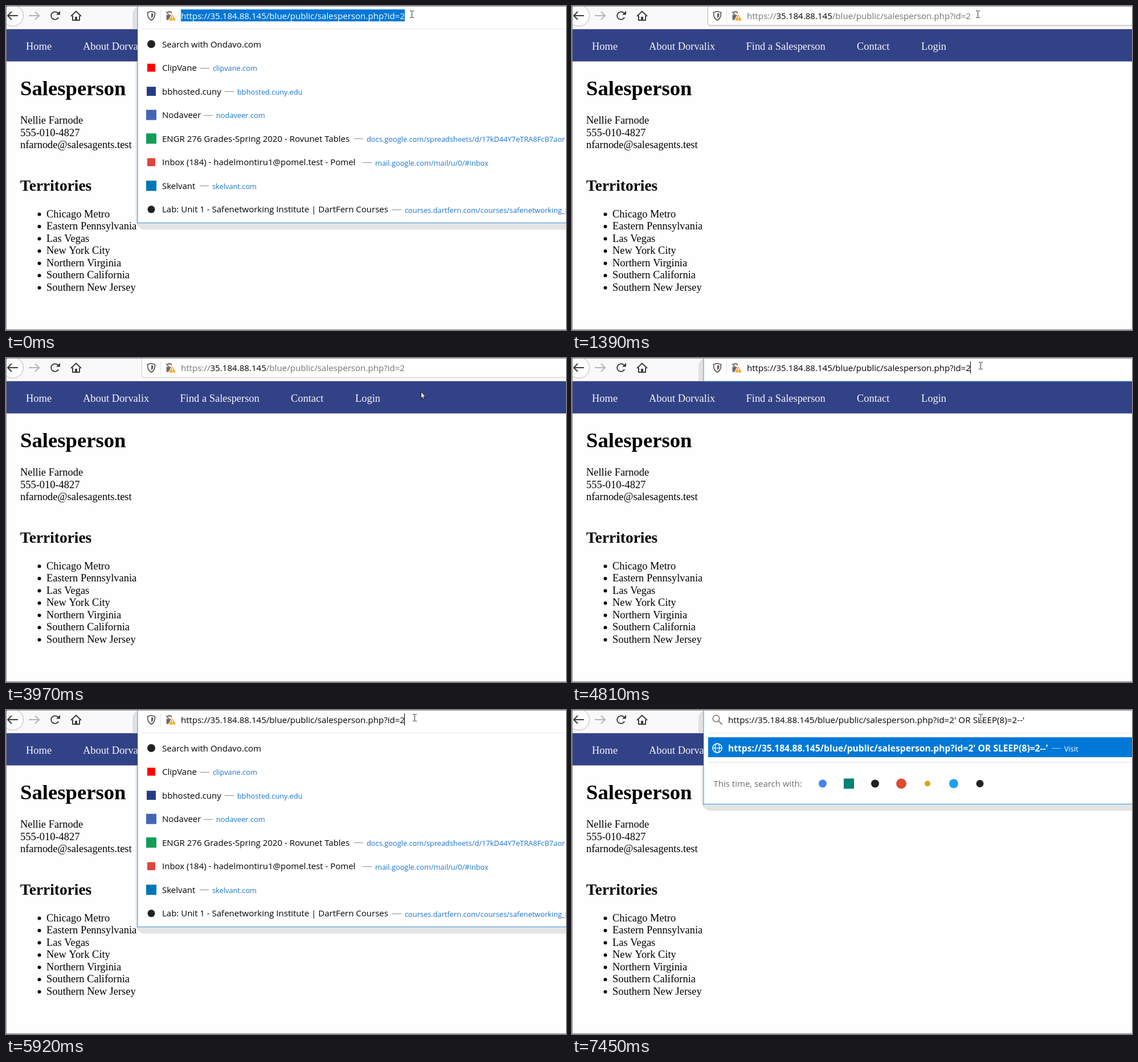
These frames come from a looping animation (983 px wide and 570 px high, 8 s). An HTML page with a canvas:

```html
<!DOCTYPE html>
<html lang="en">
<head>
<meta charset="utf-8">
<title>Address bar</title>
<style>
html, body { margin: 0; width: 100%; height: 100%; overflow: hidden; background: #fff; }
canvas { display: block; }
</style>
</head>
<body>
<canvas id="stage" width="983" height="570"></canvas>
<script>
const ctx = document.getElementById('stage').getContext('2d');
const W = 983, H = 570, LOOP = 8000;
const SANS = '"Open Sans", "Noto Sans", sans-serif';
const SERIF = '"Liberation Serif", "Times New Roman", serif';
const UI = '15.1px ' + SANS, ROW = '15px ' + SANS, SMALL = '12.8px ' + SANS;
const BLUE = '#0078d7', DARK = '#3d3d3e', LINK = '#1a73d0', INK = '#000';

const HOST = '35.184.88.145';
const PATH = '/blue/public/salesperson.php?id=2';
const URL_TEXT = 'https://' + HOST + PATH;
const TYPED = URL_TEXT + "' OR SLEEP(8)=2--'";

// icon shape, colour, half size, title, link x, link
const ROWS = [
  ['circle', '#222', 7, 'Search with Ondavo.com'],
  ['square', '#f00', 7, 'ClipVane', 363, 'clipvane.com'],
  ['square', '#243c84', 8, 'bbhosted.cuny', 406, 'bbhosted.cuny.edu'],
  ['square', '#4267b2', 9, 'Nodaveer', 369, 'nodaveer.com'],
  ['square', '#0f9d58', 9, 'ENGR 276 Grades-Spring 2020 - Rovunet Tables', 633,
    'docs.google.com/spreadsheets/d/17kD44Y7eTRA8FcB7aor'],
  ['square', '#e0443a', 7, 'Inbox (184) - hadelmontiru1@pomel.test - Pomel', 648,
    'mail.google.com/mail/u/0/#inbox'],
  ['square', '#0077b5', 9, 'Skelvant', 362, 'skelvant.com'],
  ['circle', '#222', 6.5, 'Lab: Unit 1 - Safenetworking Institute | DartFern Courses', 700,
    'courses.dartfern.com/courses/safenetworking_in'],
];
const ENGINES = [
  ['circle', '#4285f4', 7], ['square', '#008373', 9], ['circle', '#222', 7],
  ['circle', '#de4b33', 9], ['circle', '#e0a21b', 5], ['circle', '#1da1f2', 8],
  ['circle', '#222', 6.5],
];
const TERRITORIES = ['Chicago Metro', 'Eastern Pennsylvania', 'Las Vegas', 'New York City',
  'Northern Virginia', 'Southern California', 'Southern New Jersey'];

// time, x, y of the pointer
const POINTER = [
  [0, 712, 14], [2340, 653, 34], [2490, 400, 39], [2610, 122, 15], [2760, 86, 16],
  [2890, 330, 150], [3020, 644, 299], [3160, 720, 366], [3410, 725, 369], [3560, 794, 230],
  [3690, 734, 84], [3840, 725, 70], [3970, 728, 59], [4110, 722, 36], [4240, 718, 15],
  [4390, 717, 13],
];

function text(str, x, y, font, color) {
  ctx.font = font;
  ctx.fillStyle = color;
  ctx.fillText(str, x, y);
  return x + ctx.measureText(str).width;
}

function rect(x, y, w, h, color) {
  ctx.fillStyle = color;
  ctx.fillRect(x, y, w, h);
}

function path(points, color, width, close) {
  ctx.beginPath();
  points.forEach(([x, y]) => ctx.lineTo(x, y));
  if (close) ctx.closePath();
  if (width) {
    ctx.strokeStyle = color;
    ctx.lineWidth = width;
    ctx.stroke();
  } else {
    ctx.fillStyle = color;
    ctx.fill();
  }
}

function ring(x, y, r, color, width, from = 0, to = Math.PI * 2) {
  ctx.beginPath();
  ctx.arc(x, y, r, from, to);
  ctx.strokeStyle = color;
  ctx.lineWidth = width;
  ctx.stroke();
}

function dot(x, y, r, color) {
  ctx.beginPath();
  ctx.arc(x, y, r, 0, Math.PI * 2);
  ctx.fillStyle = color;
  ctx.fill();
}

function badge(shape, color, r, x, y) {
  if (shape === 'circle') dot(x, y, r, color);
  else rect(x - r, y - r, 2 * r, 2 * r, color);
}

function drawPage() {
  rect(0, 0, W, H, '#fefefe');
  rect(0, 0, W, 41, '#f9f9fa');
  rect(0, 40, W, 1, '#cfd1dc');
  rect(0, 41, W, 56.5, '#324286');
  const body = '18.45px ' + SERIF;
  [['Home', 35], ['About Dorvalix', 135], ['Find a Salesperson', 305.5],
    ['Contact', 500], ['Login', 613]].forEach(([s, x]) => text(s, x, 77, body, '#f4f5fa'));
  text('Salesperson', 25, 157, 'bold 36.7px ' + SERIF, INK);
  ['Nellie Farnode', '555-010-4827', 'nfarnode@salesagents.test']
    .forEach((s, i) => text(s, 25, 207 + i * 21.5, body, INK));
  text('Territories', 25, 325, 'bold 27.4px ' + SERIF, INK);
  TERRITORIES.forEach((s, i) => {
    dot(58.5, 366.5 + i * 21.55, 3, INK);
    text(s, 71, 371.7 + i * 21.55, body, INK);
  });
}

function drawArrow(x1, x2, color) {
  const s = Math.sign(x2 - x1);
  path([[x1, 17], [x2, 17]], color, 2);
  path([[x2 - s * 7, 10], [x2, 17], [x2 - s * 7, 24]], color, 2);
}

function drawReload(t) {
  const loading = t >= 440 && t < 710;
  ctx.save();
  if (t >= 590 && t < 840) ctx.globalAlpha = 0.5;
  if (t >= 840 && t < 1390) ctx.globalAlpha = 0.4;
  if (loading) {
    const r = t < 590 ? 6.5 : 4.5;
    path([[86.5 - r, 16.5 - r], [86.5 + r, 16.5 + r]], DARK, 2);
    path([[86.5 + r, 16.5 - r], [86.5 - r, 16.5 + r]], DARK, 2);
  } else {
    ring(86, 17, 6.8, DARK, 2, 0.45, Math.PI * 2 - 0.7);
    path([[95, 8.5], [95, 15.5], [88, 15.5]], DARK, 0, true);
  }
  ctx.restore();
}

function drawToolbar(t) {
  if (t >= 2610 && t < 2760) rect(107, 1, 32, 32, '#e1e1e2');
  if (t >= 2760 && t < 2890) rect(70, 1, 34, 32, '#e1e1e2');
  dot(12, 17, 18.5, '#fdfdfd');
  ring(12, 17, 18.5, '#b6b6b7', 1);
  drawArrow(21, 3, DARK);
  drawArrow(40, 58, '#b4b4b5');
  drawReload(t);
  path([[114, 18], [123, 9.5], [132, 18]], DARK, 2);
  path([[117, 17], [117, 25], [129, 25], [129, 17]], DARK, 2);
  rect(121, 19, 4, 6, DARK);
}

function drawSiteIcons() {
  ctx.beginPath();
  ctx.moveTo(255, 9.5);
  ctx.lineTo(261.5, 11.5);
  ctx.quadraticCurveTo(262, 21.5, 255, 25);
  ctx.quadraticCurveTo(248, 21.5, 248.5, 11.5);
  ctx.closePath();
  ctx.strokeStyle = '#59595b';
  ctx.lineWidth = 1.8;
  ctx.stroke();
  path([[255, 12.5], [258.7, 13.8], [258, 18.5], [255, 21.5]], '#59595b', 0, true);
  rect(271, 6, 1, 23, '#e4e4e5');
  ring(287, 13, 3.2, '#6b6b6d', 2, Math.PI, Math.PI * 2);
  rect(281.5, 15.5, 11, 9, '#6b6b6d');
  path([[281, 10], [293, 24]], '#6b6b6d', 1.5);
  path([[292, 14.5], [298, 25.5], [286, 25.5]], '#fff', 2.5, true);
  path([[292, 14.5], [298, 25.5], [286, 25.5]], '#ffa620', 0, true);
  rect(291.3, 18, 1.5, 4, '#fff');
  rect(291.3, 23, 1.5, 1.3, '#fff');
}

function drawClosedBar(hover) {
  ctx.beginPath();
  ctx.roundRect(238.5, -6, 800, 40, 3);
  ctx.fillStyle = '#fff';
  ctx.fill();
  ctx.strokeStyle = hover ? '#b3b3b5' : '#cbcbcd';
  ctx.lineWidth = 1;
  ctx.stroke();
  rect(240, 35, W - 240, 1, hover ? '#e3e3e5' : '#eeeeef');
  drawSiteIcons();
  let x = text('https://', 307, 23, UI, '#737376');
  x = text(HOST, x, 23, UI, INK);
  text(PATH, x, 23, UI, '#737376');
}

function drawPanel(bottom) {
  ctx.fillStyle = 'rgba(0,0,0,.1)';
  ctx.beginPath();
  ctx.roundRect(222, 1, 900, 39, [14, 0, 0, 0]);
  if (bottom > 60) ctx.roundRect(227.5, 41, 900, bottom - 29, [0, 0, 0, 17]);
  ctx.fill();
  rect(231, 1, W - 231, bottom - 1, '#fff');
  rect(230.5, 1, 1, bottom, '#3b93dd');
  rect(230.5, bottom - 0.5, W, 1, '#3b93dd');
}

function drawRow([shape, color, r, title, linkX, link], i) {
  const y = 67 + i * 41.55;
  badge(shape, color, r, 255, y);
  text(title, 274, y + 5.5, ROW, INK);
  if (!link) return;
  rect(linkX - 22, Math.round(y), 16, 1, '#8b8b8d');
  text(link, linkX, y + 5.8, SMALL, LINK);
}

function drawVisitRow() {
  rect(239, 48, W - 239, 35, BLUE);
  ring(255, 67, 8, '#fff', 1.5);
  path([[247, 67], [263, 67]], '#fff', 1.3);
  ctx.beginPath();
  ctx.ellipse(255, 67, 3.8, 8, 0, 0, Math.PI * 2);
  ctx.stroke();
  text(TYPED, 274, 72.5, 'bold 15.65px ' + SANS, '#fff');
  rect(842, 67, 16, 1, '#9fcbef');
  text('Visit', 864, 72.7, SMALL, '#fff');
}

function drawEngines(y) {
  rect(239, y - 38, W - 239, 1, '#dfdfe0');
  text('This time, search with:', 248.5, y + 5.5, ROW, '#6d6d6f');
  ENGINES.forEach((e, i) => badge(...e, 440 + i * 46, y));
}

function drawOpenBar(t) {
  const typed = t >= 7160, short = t >= 7450;
  const listed = t < 440 || t >= 4960;
  drawPanel(!listed ? 41 : short ? 165.5 : typed ? 456.5 : 381.5);
  if (listed) rect(239, 40, W - 239, 1, '#e6e6e7');
  if (typed) {
    ring(253, 15, 5.8, '#8f8f91', 2);
    path([[257, 19], [263.5, 25.5]], '#8f8f91', 2.4);
    text(TYPED, 274, 23, '15.25px ' + SANS, INK);
    if (!short) rect(795, 7, 1, 20, INK);
    drawVisitRow();
    drawEngines(short ? 129.5 : 420);
  } else {
    const selected = t < 440 || (t >= 5090 && t < 5920);
    const caret = !selected && !(t >= 6480 && t < 6880);
    drawSiteIcons();
    if (selected) rect(307, 6, 393, 21, BLUE);
    text(URL_TEXT, 307, 23, UI, selected ? '#fff' : INK);
    if (caret) rect(699, 6, 1, 21, INK);
  }
  if (listed && !short) ROWS.forEach((row, i) => { if (i || !typed) drawRow(row, i); });
}

function drawPointer(x, y, beam) {
  if (beam) {
    const c = '#333';
    rect(x, y - 5, 1, 11, c);
    rect(x - 3, y - 6, 3, 1, c);
    rect(x + 1, y - 6, 3, 1, c);
    rect(x - 3, y + 6, 3, 1, c);
    rect(x + 1, y + 6, 3, 1, c);
    return;
  }
  const shape = [[0.5, 0.5], [0.5, 12], [3, 9.7], [4.8, 14], [6.6, 13.2], [4.8, 9], [8.5, 9]]
    .map(([dx, dy]) => [x + dx, y + dy]);
  path(shape, '#fff', 0, true);
  path(shape, '#111', 1, true);
}

function draw(t) {
  const [, px, py] = POINTER.findLast(p => p[0] <= t);
  const overBar = px > 238 && py < 34;
  drawPage();
  drawToolbar(t);
  if (t < 440 || t >= 4810) drawOpenBar(t);
  else drawClosedBar(overBar);
  rect(0, 0, W, 1, '#8c8c8e');
  rect(0, 0, 1, H, '#858587');
  rect(0, H - 1, W, 1, '#7d7d7f');
  drawPointer(px, py, overBar);
}

const start = performance.now();
function tick() {
  draw((performance.now() - start) % LOOP);
  requestAnimationFrame(tick);
}
tick();
</script>
</body>
</html>
```
